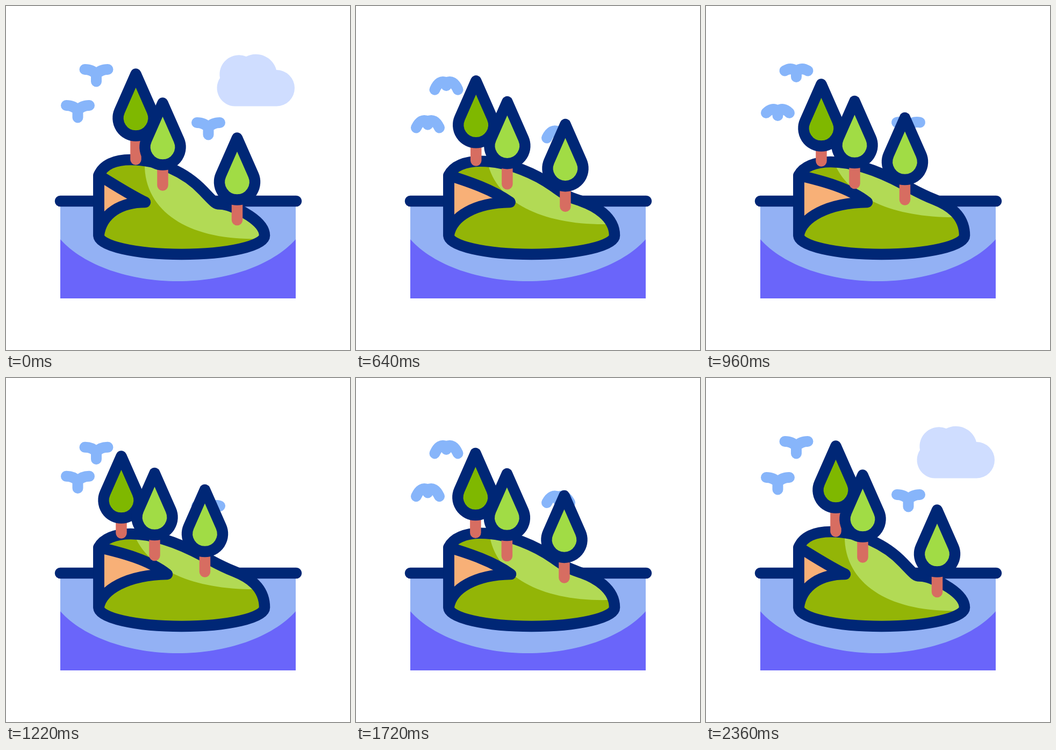
Recreate the animation shown at these times as an HTML page with a canvas. Size 640 by 640 pixels, loop 2.4 s.

```html
<!DOCTYPE html>
<html lang="en">
<head>
<meta charset="utf-8">
<title>Island</title>
<style>
  html, body { margin: 0; width: 100%; height: 100%; overflow: hidden; background: #fff; }
  canvas { display: block; width: 640px; height: 640px; }
</style>
</head>
<body>
<canvas id="stage" width="640" height="640"></canvas>
<script>
const ctx = document.getElementById('stage').getContext('2d');
const LOOP = 2400, NAVY = '#002776', LEAF = '#a1dc45';
ctx.lineCap = ctx.lineJoin = 'round';

const clamp = (v, max) => Math.min(max, Math.max(0, v));
const mix = (a, b, p) => a + (b - a) * p;

// Smooth step from 0 to 1
function ease(t, start, duration) {
  const s = clamp((t - start) / duration, 1);
  return s * s * (3 - 2 * s);
}

// Angle running through two full turns, then resting
const twoTurns = (t, delay, period) => 2 * Math.PI * clamp((t - delay) / period, 2);

function fill(path, color) { ctx.fillStyle = color; ctx.fill(path); }
function stroke(path, color, width = 20.5) {
  ctx.strokeStyle = color;
  ctx.lineWidth = width;
  ctx.stroke(path);
}
function shiftedBy(x, y, paint) {
  ctx.save();
  ctx.translate(x, y);
  paint();
  ctx.restore();
}

const seaLine = new Path2D('M101 363H540');
const deepSea = new Path2D('M101 434C145 483 230 512 320 512S495 483 539 434V544H101Z');
const crown = new Path2D('M0 0L-30.2 68.7A33 33 0 1 0 30.2 68.7Z');
const cloud = new Path2D('M427 186.5A34 34 0 0 1 398 134A36 36 0 0 1 447 94A39.5 39.5 0 0 1 503 119A33.5 33.5 0 0 1 503.5 186.5Z');

const trees = [
  { x: 241.5, y: 126.5, dx: -27, dy: 19, trunk: 159, grow: -16, color: '#7fb800' },
  { x: 291.5, y: 180.5, dx: -15, dy: -3.5, trunk: 153, grow: 0, color: LEAF },
  { x: 430, y: 245.5, dx: -60, dy: -37.5, trunk: 152.5, grow: 0, color: LEAF }];

const birds = [
  { x: 168, y: 127, delay: 130, lag: 70 },
  { x: 133.5, y: 194, delay: 200, lag: 155 },
  { x: 376.5, y: 226, delay: 30, lag: 80 }];

function drawCloud(t) {
  const leaving = t < LOOP / 2;
  const gone = leaving ? ease(t, 0, 600) : 1 - ease(t, 1790, 570);
  shiftedBy((leaving ? 77 : -77) * gone, 0, () => {
    ctx.globalAlpha = 1 - gone;
    fill(cloud, '#cfddff');
  });
}

function drawBird({ x, y, delay, lag }, t) {
  const flap = (1 - Math.cos(twoTurns(t, delay, 1050))) / 2;
  const bob = 7 - 13 * Math.cos(1 + twoTurns(t, delay + lag, 900));
  const tipY = mix(-9, 14, flap), bendX = mix(8, 13, flap), bendY = mix(-9, -5.5, flap);
  const body = new Path2D(
    `M-21.5 ${tipY}Q${-bendX} ${bendY} 0 ${flap}Q${bendX} ${bendY} 21.5 ${tipY}M0 ${flap}V${mix(13.5, 6.5, flap)}`);
  shiftedBy(x, y + bob, () => stroke(body, '#87b5fa', 20));
}

function drawIsland(p, shineP) {
  const at = (a, b) => mix(a, b, p);
  const lit = (a, b) => mix(a, b, shineP);
  const top = at(286, 290);
  const land = new Path2D(`M172.5 315C181 ${top + 9} 203 ${top} 232 ${top}
    C285 ${top} ${at(335, 340)} ${at(310, 317)} 367 ${at(344, 331.5)}
    S${at(388, 400)} ${at(365, 350)} ${at(409, 425)} ${at(370, 360)}
    S481 ${at(400, 388)} 481 427A154.25 35 0 0 1 172.5 427Z`);
  const shine = new Path2D(`M${lit(258, 238)} 290
    C${lit(255, 265)} ${lit(385, 360)} ${lit(345, 355)} ${lit(437, 395)} 471 ${lit(433, 393)}H500V270H250Z`);
  const tip = at(259, 300);
  const cove = new Path2D(`M172.5 315C${at(200, 215)} ${at(331, 325)} ${tip - 34} ${at(348, 338)} ${tip} 365
    C${at(215, 225)} ${at(365, 366.5)} 178 ${at(385, 394)} 172.5 427Z`);

  fill(land, '#93b507');
  ctx.save();
  ctx.clip(land);
  fill(shine, '#b2da55');
  ctx.restore();
  fill(cove, '#f8b077');
  stroke(cove, NAVY);
  stroke(land, NAVY);
}

function drawTree({ x, y, dx, dy, trunk, grow, color }, p) {
  shiftedBy(x + dx * p, y + dy * p, () => {
    stroke(new Path2D(`M0 115V${trunk + grow * p}`), '#d76d61');
    fill(crown, color);
    stroke(crown, NAVY);
  });
}

function draw(t) {
  const slide = ease(t, 268, 602);
  const p = slide - ease(t, 1400, 900);
  const shineP = slide - ease(t, 1400, 640);
  ctx.clearRect(0, 0, 640, 640);
  drawCloud(t);
  birds.forEach(bird => drawBird(bird, t));
  ctx.fillStyle = '#93b1f4';
  ctx.fillRect(101, 363, 438, 181);
  fill(deepSea, '#6a65fa');
  stroke(seaLine, NAVY);
  drawIsland(p, shineP);
  trees.forEach(tree => drawTree(tree, p));
}

const start = performance.now();
function frame() {
  draw((performance.now() - start) % LOOP);
  requestAnimationFrame(frame);
}
frame();
</script>
</body>
</html>
```
